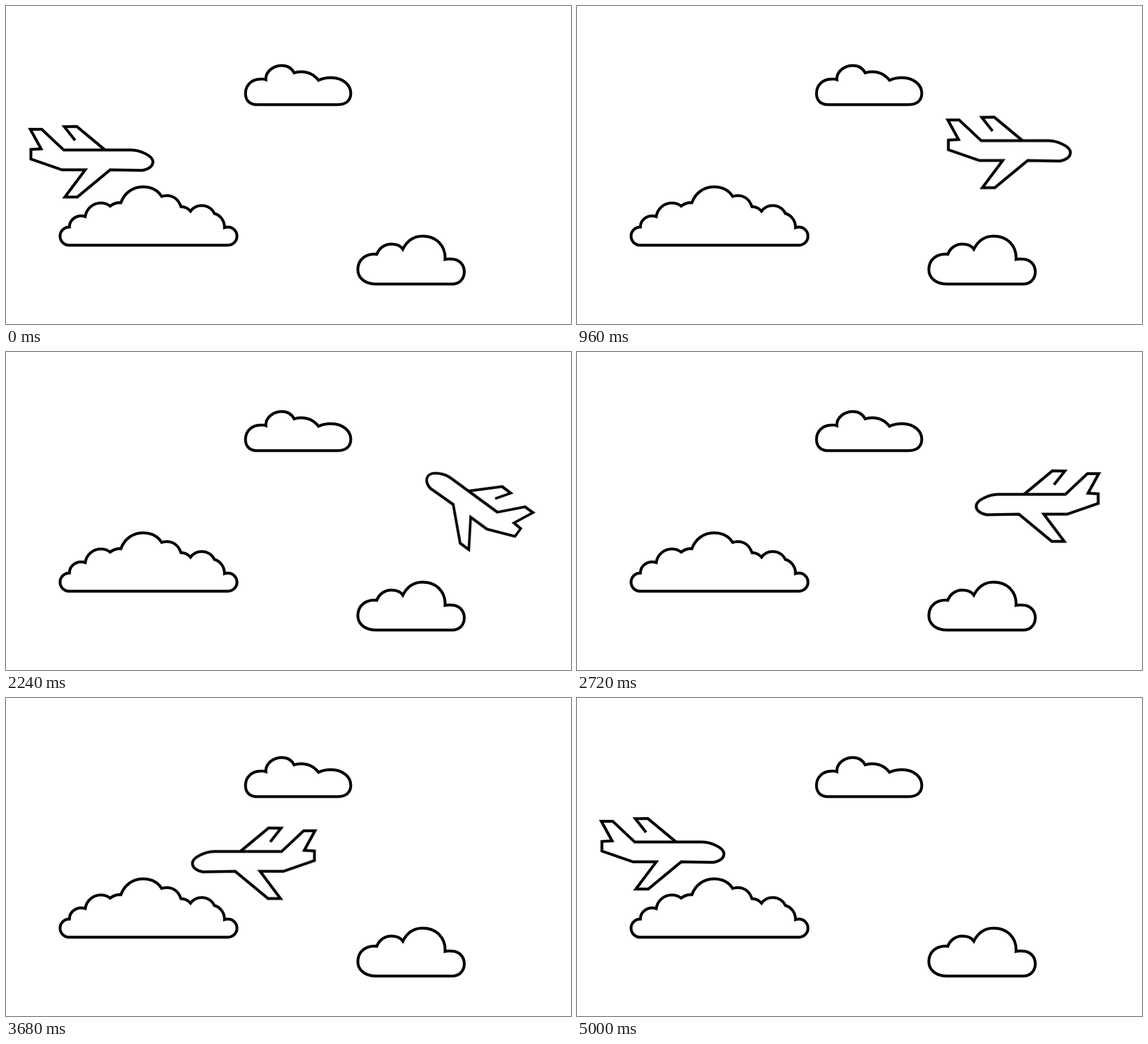
An HTML page for the animation above (5.04 s loop, 998x561 px).

```html
<!DOCTYPE html>
<html lang="en">
<head>
<meta charset="utf-8">
<title>Plane among clouds</title>
<style>
  html, body { margin: 0; width: 100%; height: 100%; overflow: hidden; background: #fff; }
  .stage { position: relative; width: 998px; height: 561px; overflow: hidden; }
  svg { position: absolute; display: block; overflow: visible; fill: none; stroke: #000; stroke-width: 5; }
  .sky { left: 0; top: 0; }
  .plane { left: -112px; top: -66px; }

  /* Nested zero-size pivots: flight out, flight back, tilt, turn */
  .out, .back, .tilt, .turn {
    position: absolute; left: 0; top: 0; width: 0; height: 0;
    animation: 5040ms linear infinite;
  }
  .out, .back { offset-rotate: 0deg; }
  .out { offset-path: path("M150 275c309 73 484 -73 672 0"); animation-name: out; }
  .back { offset-path: path("M0 0C-187 -78 -405 89 -671 -3"); animation-name: back; }
  .tilt { animation-name: tilt; }
  .turn { animation-name: turn; }

  @keyframes out {
    0% { offset-distance: 0%; animation-timing-function: cubic-bezier(.27, 0, .15, 1); }
    30.95%, 100% { offset-distance: 100%; }
  }
  @keyframes back {
    0%, 49.4% { offset-distance: 0%; animation-timing-function: cubic-bezier(.84, 0, .79, 1); }
    80.16%, 100% { offset-distance: 100%; }
  }
  @keyframes tilt {
    0%, 30.95%, 50.79%, 80.16% { transform: translate(0, 0) rotate(0deg); }
    38.89%, 43.45% { transform: translate(0, 0) rotate(42deg); }
    88.89% { transform: translate(0, 0) rotate(-3.5deg); }
    92.66%, 93.65% { transform: translate(0, 1px) rotate(-40deg); }
    99%, 100% { transform: translate(-1px, 3px) rotate(0deg); }
    0%, 30.95%, 38.89%, 43.45%, 50.79%, 88.89%, 92.66%, 93.65% {
      animation-timing-function: cubic-bezier(.37, 0, .63, 1);
    }
    80.16% { animation-timing-function: cubic-bezier(.3, 0, .7, .7); }
  }
  @keyframes turn {
    0%, 35.12% { transform: rotateY(0deg); }
    44.44% { transform: rotateY(150deg); }
    50.79%, 90.87% { transform: rotateY(180deg); }
    99.2%, 100% { transform: rotateY(360deg); }
  }
</style>
</head>
<body>
<div class="stage">
  <svg class="sky" width="998" height="561" viewBox="0 0 998 561">
    <path d="M443 174H586C600 174 609 167 609 154C609 140 596 126.5 574 126.5C566 126.5 558 128 552 131C545 122 534 116 521 116Q515 116 509 118C505 110 497 105 487 105C472 105 458 116 459 130Q455 128.5 449 129C434 129 423 140 423 154C423 167 431 174 443 174Z"/>
    <path d="M111 422H392A16 16 0 0 0 392 390Q389 390 386 391C386 379 379 369 368 366C364 357 355 352 345.500 352C338 352 331 355 326 362Q319 354 309 354C305 342 296 334.500 284 334.500Q279 334.500 275 336C268 325 256 319 242 319C224 319 209 330 203 347Q193 346 184 353Q177 347.500 168 347.500C154 347.500 142 357 140 371.500C126 367 112 376 112 390A16 16 0 0 0 111 422Z"/>
    <path d="M653 490.500H789C801 490.500 809.500 481 809.500 469C809.500 456 800 446.500 787 446.500Q781 446 775.500 447C777 423 760 406 736 406C720 406 708 415 701 429C697 423 690 420 681 420C669 420 659 427 655 438C636 436 621.500 447 621.500 465C621.500 480 634 490 653 490.500Z"/>
  </svg>
  <div class="out"><div class="back"><div class="tilt"><div class="turn">
    <svg class="plane" width="224" height="132" viewBox="38 209 224 132">
      <path d="M102 254L63 217.500H43L62 252L44 253V270L99 289H140L104 337H126L184 289L241 290C250 288 259.500 284 259.500 275C259.500 264 236 254 221 254Z"/>
      <path d="M175 254L125 212.500L103 213L122 237"/>
    </svg>
  </div></div></div></div>
</div>
</body>
</html>
```
